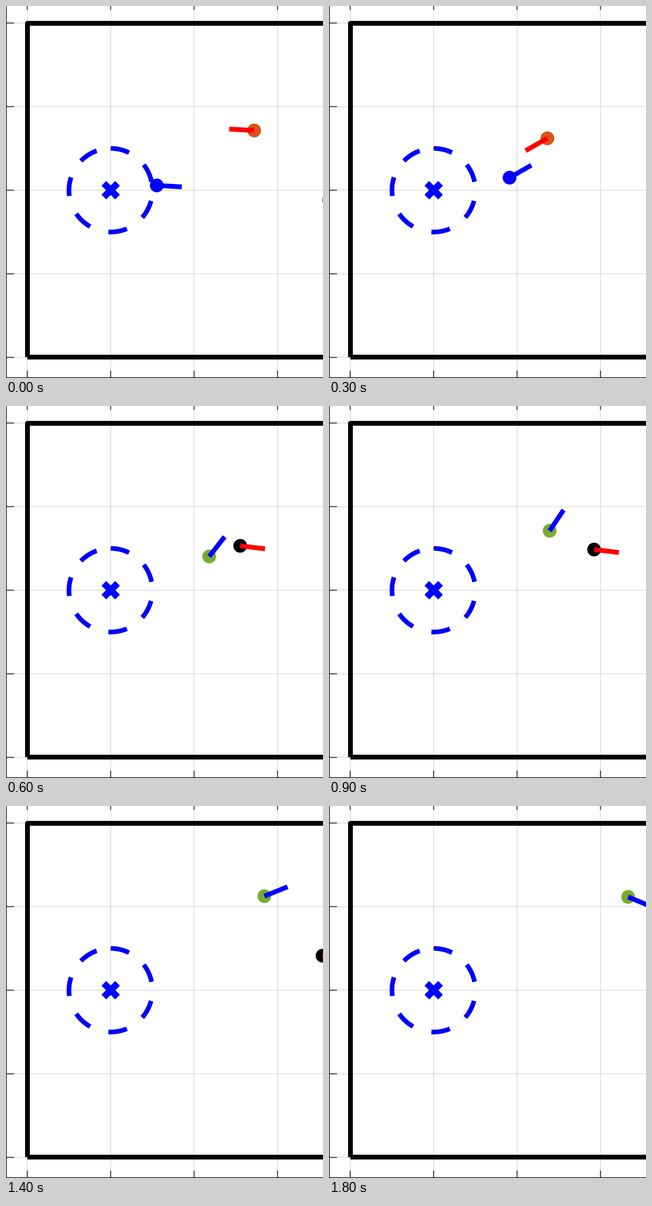
These frames come from a looping animation (532x623 px, 1.9 s). A matplotlib script:

```python
import numpy as np
import matplotlib.pyplot as plt
from matplotlib.animation import FuncAnimation
from matplotlib.patches import Circle

W, H, DPI = 532, 623, 100
FRAMES, STEP_MS = 19, 100
BLUE, RED, BLACK = "#0000ff", "#ff0000", "#000000"
ORANGE, GREEN, AXIS = "#d95319", "#77ac30", "#262626"

SPEED = 17.4        # pixels per step
ARM = 42            # length of the heading line
RADIUS = 11.5
CONTACT = 3.78      # moment the two agents meet, in steps
MIRROR = np.array([669.5, 509.0])

# Blue agent: step, x, y, heading in degrees (upwards positive)
KEYS = [(0, 253, 300.5, -3.3), (3, 303, 287.5, 29.7), (6, 341, 252, 51.8),
        (9, 370.3, 209, 56.2), (11, 391.6, 181, 48), (14, 433.6, 151, 22),
        (18, 502, 152.3, -22.5)]

fig = plt.figure(figsize=(W / DPI, H / DPI), dpi=DPI, facecolor="white")
ax = fig.add_axes([0, 0, 1, 1])
ax.set_xlim(0, W)
ax.set_ylim(H, 0)
ax.axis("off")


def stroke(xs, ys, color, width, **kw):
    line, = ax.plot(xs, ys, color=color, lw=width * 72 / DPI, snap=False,
                    solid_capstyle="butt", solid_joinstyle="round", **kw)
    return line


def disc(x, y, color, z):
    return ax.add_patch(Circle((x, y), RADIUS, fc=color, ec="none", zorder=z))


def unit(deg):
    a = np.radians(deg)
    return np.array([np.cos(a), -np.sin(a)])


def blue_state(t):
    """Position and unit heading on a cubic Hermite path."""
    i = max(k for k in range(len(KEYS) - 1) if KEYS[k][0] <= t)
    (t0, x0, y0, a0), (t1, x1, y1, a1) = KEYS[i:i + 2]
    n = t1 - t0
    s = (t - t0) / n
    p0, p1 = np.array([x0, y0]), np.array([x1, y1])
    m0, m1 = SPEED * n * unit(a0), SPEED * n * unit(a1)
    pos = ((2*s**3 - 3*s**2 + 1) * p0 + (s**3 - 2*s**2 + s) * m0
           + (3*s**2 - 2*s**3) * p1 + (s**3 - s**2) * m1)
    vel = (6 * (s*s - s) * (p0 - p1) + (3*s*s - 4*s + 1) * m0
           + (3*s*s - 2*s) * m1)
    return pos, vel / np.hypot(*vel)


def red_state(t):
    """Mirrors blue until contact, then leaves in a straight line."""
    if t < CONTACT:
        pos, head = blue_state(t)
        return MIRROR - pos, -head
    head = unit(-6.8)
    return np.array([393, 234.2]) + (t - 6) * SPEED * head, head


# Grid, ticks and axis lines
for k in range(4):
    x = 35.6 + 140 * k
    stroke([x, x], [0, H], AXIS, 1.5, alpha=0.15, zorder=1)
    stroke([x, x], [0, 6.5], AXIS, 1.5, zorder=2)
    stroke([x, x], [610.5, H], AXIS, 1.5, zorder=2)
for k in range(5):
    y = 28.5 + 140 * k
    stroke([0, W], [y, y], AXIS, 1.5, alpha=0.15, zorder=1)
    stroke([0, 13.5], [y, y], AXIS, 1.5, zorder=2)
stroke([0.6, 0.6], [0, H], AXIS, 1.4, zorder=2)
stroke([0, W], [622.4, 622.4], AXIS, 1.4, zorder=2)

# Arena wall
stroke([36, W + 40, W + 40, 36, 36], [588, 588, 29, 29, 588], BLACK, 8, zorder=3)

# Dashed target zone with its cross
CX, CY = 175.7, 308.5
for k in range(7):
    a = np.radians(np.linspace(90, 64, 20) - 52.4 * k)
    stroke(CX + 70 * np.cos(a), CY - 70 * np.sin(a), BLUE, 7.8, zorder=4)
for d in (11.5, -11.5):
    stroke([CX - 11.5, CX + 11.5], [CY - d, CY + d], BLUE, 11.2, zorder=4)

bystander = disc(542, 325, GREEN, 5)
red_disc = disc(0, 0, ORANGE, 5)
red_arm = stroke([], [], RED, 8, zorder=6)
blue_disc = disc(0, 0, BLUE, 7)
blue_arm = stroke([], [], BLUE, 8, zorder=8)


def place(dot, arm, state):
    pos, head = state
    tip = pos + ARM * head
    dot.center = tuple(pos)
    arm.set_data([pos[0], tip[0]], [pos[1], tip[1]])


def update(t):
    met = t >= CONTACT
    place(blue_disc, blue_arm, blue_state(t))
    place(red_disc, red_arm, red_state(t))
    blue_disc.set_facecolor(GREEN if met else BLUE)
    red_disc.set_facecolor(BLACK if met else ORANGE)
    bystander.set_visible(t == 0)
    return blue_disc, blue_arm, red_disc, red_arm, bystander


anim = FuncAnimation(fig, update, frames=FRAMES, interval=STEP_MS,
                     repeat=True, repeat_delay=0, blit=False)
plt.show()
```
